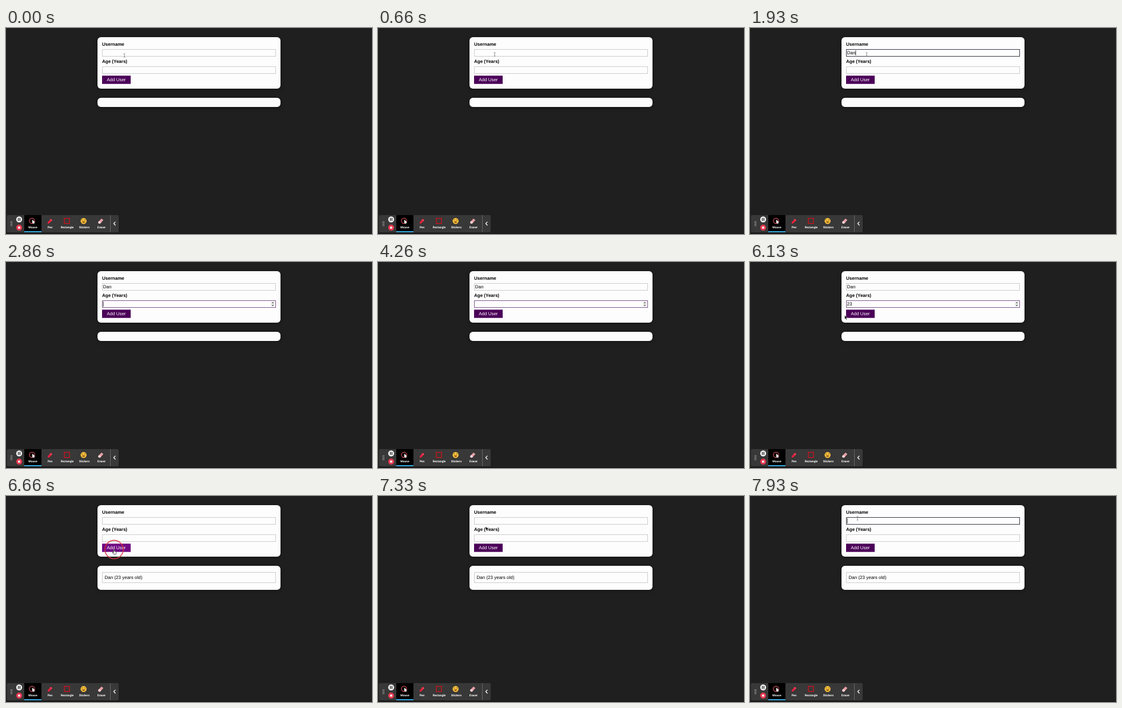
An HTML page for the animation above (8000 ms loop, 640 px wide and 360 px high).

```html
<!DOCTYPE html>
<html lang="en">
<head>
<meta charset="utf-8">
<title>Add user form</title>
<style>
  html, body { margin: 0; width: 100%; height: 100%; overflow: hidden; background: #1f1f1f; }
  svg { display: block; width: 100vw; height: 100vh; text-rendering: geometricPrecision; }
  text { font: 8px "Liberation Sans", Arial, sans-serif; }
  .label { font-weight: bold; }
  .card { fill: #fdfdfd; filter: drop-shadow(0 1px 3px rgba(0, 0, 0, .4)); }
  .field { fill: #fdfdfd; stroke: #ccc; }
  .tool text { font: bold 5px Roboto, sans-serif; fill: #fff; text-anchor: middle; }
</style>
</head>
<body>
<svg viewBox="0 0 640 360">
  <rect width="640" height="360" fill="#1f1f1f"/>
  <rect y="359" width="640" height="1" fill="#111"/>

  <rect class="card" x="160" y="16" width="320" height="90" rx="6"/>
  <text class="label" x="168" y="31.3">Username</text>
  <text class="label" x="168" y="61.3">Age (Years)</text>
  <rect id="nameBox" class="field" x="168.5" y="37.5" width="303" height="12"/>
  <rect id="ageBox" class="field" x="168.5" y="67.5" width="303" height="12"/>
  <text id="name" x="169.8" y="46.3"></text>
  <text id="age" x="169.5" y="76.1"></text>
  <g id="spinner">
    <rect x="463" y="69" width="7" height="9" rx="1" fill="#ececec"/>
    <path d="M464.8 72l1.7-2 1.7 2zM464.8 75l1.7 2 1.7-2z" fill="#444"/>
  </g>
  <rect id="caret" width=".8" height="9" fill="#111"/>
  <rect id="button" x="168" y="83.3" width="50" height="14.4"/>
  <text x="176.2" y="93.4" fill="#fff">Add User</text>

  <rect id="list" class="card" x="160" y="122" width="320" height="16" rx="6"/>
  <g id="item">
    <rect class="field" x="168.5" y="133.5" width="303" height="18"/>
    <text x="172.5" y="145.3">Dan (23 years old)</text>
  </g>

  <rect x="1.5" y="327" width="195.5" height="30" rx="2" fill="#383838"/>
  <path d="M8 338.6h3M8 341h3M8 343.4h3M8 345.8h3" stroke="#ccc" stroke-width="1.1" stroke-dasharray="1.1 .9"/>
  <circle cx="23" cy="334.5" r="5.2" fill="#eee"/>
  <path d="M21.6 332v5M24.4 332v5" stroke="#222" stroke-width="1.3"/>
  <circle cx="23" cy="348.8" r="5.2" fill="#e5384f"/>
  <rect x="21.2" y="347" width="3.6" height="3.6" fill="#fff"/>
  <rect x="32" y="327" width="30" height="30"/>
  <rect x="32" y="355" width="30" height="2" fill="#35a8e0"/>
  <g class="tool">
    <circle cx="45.5" cy="337" r="4.6" fill="none" stroke="#d8505c" stroke-width="1.2"/>
    <path d="M46 334.8v7l1.6-1.4 1 2.2 1.2-.5-1-2.2h2.2z" fill="#fff"/>
    <text x="47" y="350.2">Mouse</text>
    <path d="M72.5 342.3l.9-3.6 5.2-5.5 2.6 2.5-5.3 5.5z" fill="#e5213c"/>
    <path d="M77.3 334.5l2.7 2.6" stroke="#f5a0a8" stroke-width=".8"/>
    <text x="77" y="350.2">Pen</text>
    <rect x="102" y="332.6" width="9" height="9" fill="none" stroke="#d5101c" stroke-width="1.3"/>
    <text x="107" y="350.2">Rectangle</text>
    <circle cx="135.7" cy="337.2" r="5.2" fill="#f8c33c"/>
    <path d="M132.3 336q1.2-1.8 2.4 0M136.8 336q1.2-1.8 2.4 0" fill="none" stroke="#5a3510" stroke-width=".9"/>
    <path d="M132.8 338.3h5.8q-2.9 4.4-5.8 0z" fill="#7a3b18"/>
    <text x="137" y="350.2">Stickers</text>
    <path d="M161 339.3l6-6.2 3.3 2.6-5.8 6.2-2.6-.4z" fill="#e9a0a8"/>
    <path d="M161 339.3l2-2 3.3 2.8-1.8 1.8-2.6-.4z" fill="#f6d5d8"/>
    <text x="167" y="350.2">Eraser</text>
  </g>
  <rect x="182" y="327" width="1" height="30" fill="#666"/>
  <path d="M191.4 338.6l-3 3.2 3 3.2" fill="none" stroke="#fff" stroke-width="1.3"/>

  <circle id="ring" fill="none" stroke="#d9343f" stroke-width="1.8"/>
  <g id="cursor">
    <path id="beam" d="M-1.5-3.3q1.5 0 1.5 1v4.6q0 1-1.5 1M1.5-3.3q-1.5 0-1.5 1M1.5 3.3q-1.5 0-1.5-1" fill="none" stroke="#777" stroke-width=".8"/>
    <path id="arrow" d="M0 0v7l1.6-1.5 1.1 2.4 1.3-.6-1.1-2.3h2.2z" fill="#000" stroke="#fff" stroke-width=".5"/>
    <path id="hand" d="M-.8.5q.8-1 1.6 0v2.6l2.4.7q.8.3.7 1.3l-.5 2.2-.7 1.2h-3.2l-2.3-3q-.2-1 .7-.8l1.3 1z" fill="#fff" stroke="#111" stroke-width=".7"/>
  </g>
</svg>
<script>
const LOOP = 8000, STEP = 1000 / 15, BLINK = 495;
const $ = id => document.getElementById(id);
const show = (id, on) => $(id).setAttribute("visibility", on ? "visible" : "hidden");
const set = (id, attrs) => { for (const k in attrs) $(id).setAttribute(k, attrs[k]); };
const last = (list, t) => list.filter(e => e[0] <= t).pop();

// [time, text]
const nameKeys = [[0, ""], [1460, "D"], [1730, "Da"], [1860, "Dan"], [6660, ""]];
const ageKeys = [[0, ""], [4330, "2"], [4460, "23"], [6660, ""]];
// [time, focused field]
const focuses = [[0, ""], [730, "name"], [2800, "age"], [6530, ""], [7860, "name"]];
// [time, x, y]
const path = [[0, 207, 48], [660, 204, 46], [5800, 204, 56], [6130, 165.5, 93],
              [6460, 189, 93.5], [7200, 189, 93.5], [7400, 188, 39], [8000, 188, 39]];
// [press, duration]
const clicks = [[730, 130], [6530, 260], [7800, 130]];

function pointer(t) {
  if (t > 660 && t < 5800) return [204, 46];
  const i = path.findIndex(p => p[0] > t);
  const [t0, x0, y0] = path[i - 1], [t1, x1, y1] = path[i];
  const u = (t - t0) / (t1 - t0), k = u * u * (3 - 2 * u);
  return [x0 + (x1 - x0) * k, y0 + (y1 - y0) * k];
}

function drawPointer(t) {
  const [x, y] = pointer(t);
  const visible = t < 2800 || t >= 5800;
  const inside = (top, bottom, right) => x >= 168 && x <= right && y >= top && y <= bottom;
  const hover = visible && inside(83, 98, 218);
  const text = inside(37, 50, 472) || inside(54, 63, 212) || inside(67, 80, 472);
  set("cursor", { transform: `translate(${x} ${y})` });
  show("hand", hover);
  show("beam", visible && text);
  show("arrow", visible && !text && !hover);
  set("button", { fill: hover ? "#6f0982" : "#4b0058" });

  const click = clicks.find(([at, length]) => t >= at && t < at + length);
  show("ring", click);
  if (click) set("ring", { cx: x, cy: y, r: 7 + 9 * Math.min(1, (t - click[0]) / 130), opacity: .8 });
}

function drawForm(t) {
  $("name").textContent = last(nameKeys, t)[1];
  $("age").textContent = last(ageKeys, t)[1];
  const [since, field] = last(focuses, t);
  set("nameBox", { style: field === "name" ? "stroke:#3c3544" : "" });
  set("ageBox", { style: field === "age" ? "stroke:#7d5a8c" : "" });
  show("spinner", field === "age");

  // The caret restarts its blink at every focus change and key press.
  const typed = last(field === "age" ? ageKeys : nameKeys, t)[0];
  const base = (typed > since ? typed : since) - 30;
  show("caret", field && Math.floor((t - base) / BLINK) % 2 === 0);
  if (field) set("caret", {
    x: 169.8 + $(field).getComputedTextLength(),
    y: field === "age" ? 69 : 39
  });

  const added = t >= 6660;
  show("item", added);
  set("list", { height: added ? 42 : 16 });
}

function frame(now) {
  const t = Math.floor((now % LOOP + 8) / STEP) * STEP % LOOP;
  drawForm(t);
  drawPointer(t);
  requestAnimationFrame(frame);
}
frame(0);
</script>
</body>
</html>
```
